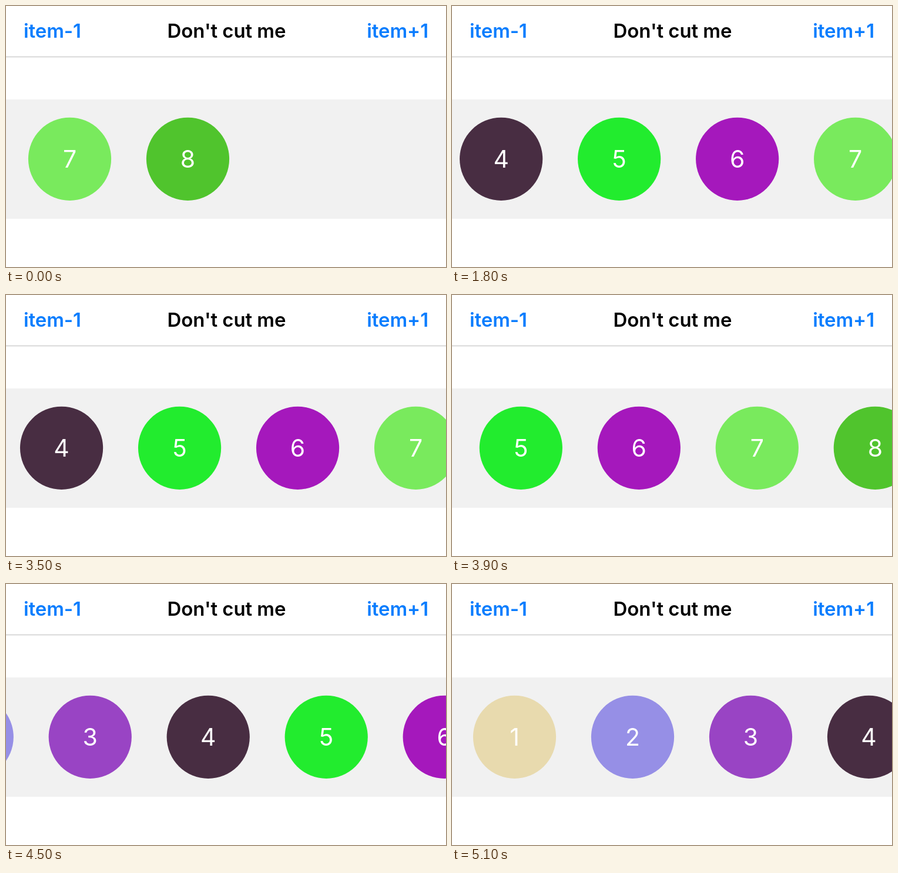
An HTML page that plays this animation: 749x444 px, repeating every 5200 ms.

```html
<!DOCTYPE html>
<html lang="en">
<head>
<meta charset="utf-8">
<title>Paged circles</title>
<style>
  html, body { margin: 0; width: 100%; height: 100%; overflow: hidden; background: #fff; }
  svg { display: block; width: 100%; height: 100%; }
  text { font-family: Inter, Roboto, sans-serif; }
  .bar { font-size: 33px; font-weight: 600; letter-spacing: -0.1px; }
  .link { fill: #0a7dfe; }
  .num { font-size: 41px; fill: #fff; text-anchor: middle; }
</style>
</head>
<body>
<svg viewBox="0 0 749 444">
  <rect y="85.7" width="749" height="1.6" fill="#cfcfcf"/>
  <g class="bar">
    <text class="link" x="30" y="54">item-1</text>
    <text x="375.5" y="54" text-anchor="middle">Don't cut me</text>
    <text class="link" x="719" y="54" text-anchor="end">item+1</text>
  </g>
  <rect y="159" width="749" height="203" fill="#f1f1f1"/>
  <g id="strip"></g>
</svg>
<script>
const LOOP = 5200, TICK = 100;
const PITCH = 201, REST = 107;
const colors = ['#e8daae', '#968fe6', '#9944c4', '#482d42',
                '#22ec2e', '#a518bc', '#79ea5d', '#50c42d'];

// Each swipe follows a logistic curve: pages moved, start, midpoint, softness.
const swipes = [
  { pages: 3, start: 1400, mid: 1588, soft: 66 },
  { pages: -1, start: 3500, mid: 3693, soft: 71 },
  { pages: 4, start: 4100, mid: 4485, soft: 83 }
];

const strip = document.getElementById('strip');

function add(tag, attrs, text = '') {
  const el = document.createElementNS('http://www.w3.org/2000/svg', tag);
  for (const key in attrs) el.setAttribute(key, attrs[key]);
  el.textContent = text;
  strip.appendChild(el);
}

colors.forEach((fill, i) => {
  const x = i * PITCH;
  add('circle', { cx: x, cy: 260.3, r: 70.6, fill });
  add('text', { class: 'num', x, y: 275 }, i + 1);
});

function progress(t, { start, mid, soft }) {
  return t < start ? 0 : 1 / (1 + Math.exp((mid - t) / soft));
}

function offset(t) {
  const settle = 1.5 * Math.max(0, 1 - t / 200) ** 2;
  const pages = swipes.reduce((sum, s) => sum + s.pages * progress(t, s), -6);
  return REST + settle + pages * PITCH;
}

function draw(now) {
  const t = Math.floor((now % LOOP) / TICK) * TICK;
  strip.setAttribute('transform', `translate(${offset(t).toFixed(2)} 0)`);
}

const begin = performance.now();
function frame() {
  draw(performance.now() - begin);
  requestAnimationFrame(frame);
}
frame();
</script>
</body>
</html>
```
